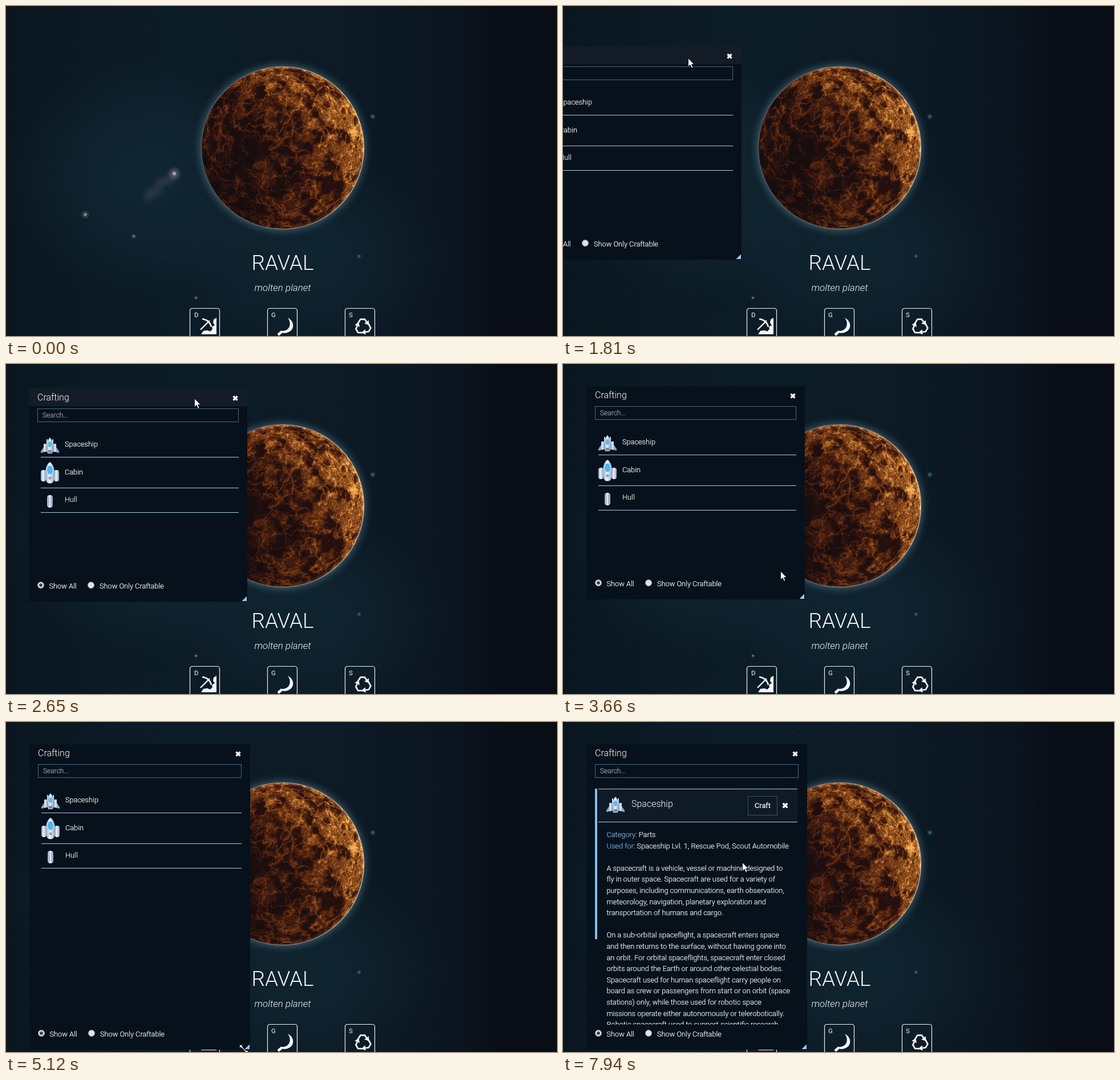
An HTML page with a canvas that plays this animation: 966 by 579 pixels, repeating every 8000 ms.

```html
<!DOCTYPE html>
<html lang="en">
<head>
<meta charset="utf-8">
<title>Crafting</title>
<style>
html, body { margin: 0; width: 100%; height: 100%; overflow: hidden; background: #0b1721; }
body { font: 300 12.75px/20px Roboto, sans-serif; color: #fff; }
#stage { position: absolute; left: 0; top: 0; width: 966px; height: 579px; overflow: hidden; }
#space, #scene { position: absolute; left: 0; top: 0; }
#panel { position: absolute; left: 0; top: 0; background: #06111b; overflow: hidden; -webkit-text-stroke: .2px; }
#panel * { box-sizing: border-box; white-space: nowrap; }
#panel div, #panel span, #panel svg { position: absolute; }
#header { left: 0; right: 0; top: 0; height: 31px; }
#header.lit { background: #131c27; }
.large { font-size: 16px; -webkit-text-stroke: 0; }
#search { left: 15px; right: 15px; top: 35px; height: 24px; border: 1px solid #426987; padding-left: 8px; line-height: 22px; font-size: 12px; color: #a5abb0; }
#list, #details { left: 0; right: 0; top: 0; bottom: 0; }
.row { left: 21px; right: 15px; border-bottom: 1px solid #a4cbed; }
.row.hover { background: #0f1b27; }
.row span { left: 42px; }
#details { bottom: 44px; overflow: hidden; }
#bar { left: 15px; top: 78px; width: 4px; height: 264px; background: #85bdf0; }
#card { left: 21px; top: 78px; height: 59px; background: #0e1a26; border: solid #a4cbed; border-width: 1px 0; }
#craft { right: 35px; top: 12px; width: 52px; height: 34px; border: 1px solid #36536b; text-align: center; line-height: 32px; font-weight: 400; }
#text { left: 35.5px; top: 149px; line-height: 19.6px; }
#text b { font-weight: 300; color: #7db9ee; }
#footer { left: 0; right: 0; bottom: 0; height: 44px; }
.radio { top: 9px; width: 12px; height: 12px; border-radius: 50%; background: #e2e2e2; border: 1px solid #9b9b9b; }
.radio.on { background: radial-gradient(circle, #444 0 2.6px, #e2e2e2 3.2px); }
#grip { right: 1px; bottom: 1px; width: 8px; height: 8px; background: linear-gradient(135deg, transparent 50%, #94c8f8 50%); }
.pointer { position: absolute; left: 0; top: 0; overflow: visible; }
</style>
</head>
<body>
<div id="stage">
  <canvas id="space" width="966" height="579"></canvas>
  <svg id="scene" width="966" height="579" fill="#f4f6f8" font-family="Roboto, sans-serif" font-weight="300">
    <defs>
      <linearGradient id="metal"><stop stop-color="#8fa6c4"/><stop offset=".45" stop-color="#eef4fb"/><stop offset="1" stop-color="#8b9fbd"/></linearGradient>
      <symbol id="ship" viewBox="0 0 32 30">
        <path d="M9 12 0 25v3l9-2h14l9 2v-3L23 12z" fill="#8ea4c0"/>
        <path d="M5 12h4v14H5zM23 12h4v14h-4zM10 4h2v12h-2zM20 4h2v12h-2z" fill="#cfdcec"/>
        <path d="M16 1c6 6 7 18 4 28h-8C9 19 10 7 16 1z" fill="url(#metal)"/>
        <ellipse cx="16" cy="13" rx="3.2" ry="5" fill="#59b9ef"/>
        <path d="M13 23h6v5h-6z" fill="#7088a8"/>
      </symbol>
      <symbol id="cabin" viewBox="0 0 32 38">
        <rect y="14" width="9" height="20" rx="4" fill="url(#metal)"/>
        <rect x="23" y="14" width="9" height="20" rx="4" fill="url(#metal)"/>
        <path d="M16 0c9 5 11 27 5 36q-5 3-10 0C5 27 7 5 16 0z" fill="url(#metal)"/>
        <ellipse cx="16" cy="14" rx="5.5" ry="8" fill="#4db4ee" stroke="#c9ecff"/>
        <circle cx="16" cy="28" r="2.5" fill="#8aa0bf"/>
      </symbol>
      <symbol id="hull" viewBox="0 0 10 22"><rect width="10" height="22" rx="4.5" fill="url(#metal)"/><path d="M3 3v16M7 3v16" stroke="#8395b5"/></symbol>
      <symbol id="cross" viewBox="0 0 12 12"><path d="M2.5 2.5l7 7m0-7l-7 7" stroke="#f4f6f8" stroke-width="3.4"/></symbol>
      <g id="key"><rect x=".5" y=".5" width="52" height="56" rx="4" fill="none" stroke="#eef2f5" stroke-width="1.2"/></g>
    </defs>
    <g text-anchor="middle">
      <text x="485" y="463" font-size="37">RAVAL</text>
      <text x="485" y="500" font-size="17" font-style="italic">molten planet</text>
    </g>
    <g font-size="11.5" font-weight="400">
      <use href="#key" x="322" y="530"/><text x="330" y="546">D</text>
      <use href="#key" x="458" y="530"/><text x="465" y="546">G</text>
      <use href="#key" x="594" y="530"/><text x="601" y="546">S</text>
    </g>
    <path d="M369 547l-5 3-1 6 3 4-5 3 1 4-4 4-5-2-7 1-4 6h27z"/>
    <path d="M341 568l16-16M344 549q13 2 16 14" fill="none" stroke="#f4f6f8" stroke-width="2.4"/>
    <path d="M494 547c14 7 13 27-8 27l-3-4c14 1 19-12 11-23z"/>
    <path d="M477 577l7-6" stroke="#f4f6f8" stroke-width="4.5"/>
    <g id="recycle"></g>
  </svg>

  <div id="panel">
    <div id="header"></div>
    <span class="large" style="left:15px;top:6px">Crafting</span>
    <svg style="right:15px;top:11px" width="12" height="12"><use href="#cross"/></svg>
    <div id="search">Search...</div>
    <div id="list">
      <div class="row" style="top:78px;height:43px"><svg width="32" height="30" style="top:7px"><use href="#ship"/></svg><span style="top:10px">Spaceship</span></div>
      <div class="row" style="top:121px;height:54px"><svg width="32" height="38" style="top:8px"><use href="#cabin"/></svg><span style="top:16px">Cabin</span></div>
      <div class="row" style="top:175px;height:43px"><svg width="10" height="22" style="left:11px;top:12px"><use href="#hull"/></svg><span style="top:10px">Hull</span></div>
    </div>
    <div id="details">
      <div id="bar"></div>
      <div id="card">
        <svg width="32" height="30" style="left:14px;top:12px"><use href="#ship"/></svg>
        <span class="large" style="left:58px;top:16px">Spaceship</span>
        <div id="craft">Craft</div>
        <svg style="right:15px;top:22px" width="13" height="13"><use href="#cross"/></svg>
      </div>
      <div id="text"><b>Category:</b> Parts<br><b>Used for:</b> Spaceship Lvl. 1, Rescue Pod, Scout Automobile<br><br>A spacecraft is a vehicle, vessel or machine designed to<br>fly in outer space. Spacecraft are used for a variety of<br>purposes, including communications, earth observation,<br>meteorology, navigation, planetary exploration and<br>transportation of humans and cargo.<br><br>On a sub-orbital spaceflight, a spacecraft enters space<br>and then returns to the surface, without having gone into<br>an orbit. For orbital spaceflights, spacecraft enter closed<br>orbits around the Earth or around other celestial bodies.<br>Spacecraft used for human spaceflight carry people on<br>board as crew or passengers from start or on orbit (space<br>stations) only, while those used for robotic space<br>missions operate either autonomously or telerobotically.<br>Robotic spacecraft used to support scientific research</div>
    </div>
    <div id="footer">
      <div class="radio on" style="left:15px"></div><span style="left:35.5px;top:7px">Show All</span>
      <div class="radio" style="left:103px"></div><span style="left:124px;top:7px">Show Only Craftable</span>
    </div>
    <div id="grip"></div>
  </div>

  <svg id="arrow" class="pointer" width="12" height="19"><path d="M.5.5v15l3.5-3.2 2.6 5.6 2.3-1-2.5-5.4h4.6z" fill="#fff" stroke="#000" stroke-width=".8"/></svg>
  <svg id="resize" class="pointer" width="1" height="1">
    <g fill="#fff" stroke="#000" stroke-width=".8"><path id="half" d="M-7.5-7.5h6l-2 2L.5-.5l-1 1-5-4-2 2z"/><use href="#half" transform="rotate(180)"/></g>
  </svg>
</div>
<script>
const $ = id => document.getElementById(id);
const clamp = (v, lo = 0, hi = 1) => Math.min(hi, Math.max(lo, v));
const mix = (a, b, k) => a + (b - a) * k;
const smooth = k => k * k * (3 - 2 * k);

// Seeded noise
function hash(x, y) {
  const s = Math.sin(x * 127.1 + y * 311.7) * 43758.5453;
  return s - Math.floor(s);
}

function noise(x, y) {
  const i = Math.floor(x), j = Math.floor(y), u = smooth(x - i), v = smooth(y - j);
  return mix(mix(hash(i, j), hash(i + 1, j), u), mix(hash(i, j + 1), hash(i + 1, j + 1), u), v);
}

function fbm(x, y, octaves) {
  let sum = 0, total = 0;
  for (let n = 0, gain = 1; n < octaves; n++, gain *= .55) {
    sum += gain * noise(x * 2.1 ** n, y * 2.1 ** n);
    total += gain;
  }
  return sum / total;
}

// Background and planet, painted once
const ctx = $('space').getContext('2d');

function glow(x, y, rx, ry, rgb, alpha) {
  ctx.save();
  ctx.translate(x, y);
  ctx.scale(rx, ry);
  const g = ctx.createRadialGradient(0, 0, 0, 0, 0, 1);
  g.addColorStop(0, `rgba(${rgb},${alpha})`);
  g.addColorStop(.5, `rgba(${rgb},${alpha * .6})`);
  g.addColorStop(1, `rgba(${rgb},0)`);
  ctx.fillStyle = g;
  ctx.fillRect(-1, -1, 2, 2);
  ctx.restore();
}

function star(x, y, r) {
  glow(x, y, r, r, '160,140,160', .45);
  glow(x, y, r * .35, r * .35, '235,220,230', .8);
}

function paintSpace() {
  const sky = ctx.createLinearGradient(0, 0, 966, 0);
  sky.addColorStop(0, '#0a1721');
  sky.addColorStop(.3, '#0c1c27');
  sky.addColorStop(.6, '#0c1b26');
  sky.addColorStop(.82, '#0b151f');
  sky.addColorStop(.9, '#090d15');
  ctx.fillStyle = sky;
  ctx.fillRect(0, 0, 966, 579);
  glow(240, 300, 240, 210, '20,45,58', .65);
  glow(530, 440, 250, 170, '19,44,56', .55);
  for (let i = 0; i < 260; i++) {
    const x = hash(i, 1) * 850, y = hash(i, 2) * 579;
    ctx.fillStyle = `rgba(${hash(i, 3) > .5 ? '90,125,145' : '3,10,16'},${.1 + hash(i, 4) * .3})`;
    ctx.fillRect(x, y, 1.2, 1.2);
  }
  for (let i = 0; i < 14; i++) {
    const along = i / 13, spread = 10 * (hash(i, 5) - .5);
    glow(mix(294, 250, along) + spread, mix(298, 338, along) + spread, 14, 12, '90,86,104', .13);
  }
  star(295, 294, 13);
  star(139, 366, 8);
  star(224, 404, 5);
  star(333, 512, 4);
  glow(643, 194, 5, 5, '58,125,160', .8);
  glow(619, 439, 4, 4, '58,125,160', .8);
}

function paintPlanet(cx, cy, radius) {
  const size = radius * 2, layer = document.createElement('canvas');
  layer.width = layer.height = size;
  const pen = layer.getContext('2d'), image = pen.createImageData(size, size);
  const crack = (x, y, sharpness) => (1 - Math.abs(2 * fbm(x, y, 2) - 1)) ** sharpness;
  for (let py = 0; py < size; py++) for (let px = 0; px < size; px++) {
    const u = (px + .5) / radius - 1, v = (py + .5) / radius - 1, r = Math.hypot(u, v);
    if (r > 1) continue;
    const bulge = 1 + .35 * r ** 4, x = u * bulge + 7, y = v * bulge + 3;
    const jagX = x + .16 * fbm(x * 12, y * 12, 2), jagY = y + .16 * fbm(x * 12 + 40, y * 12, 2);
    const grain = noise(x * 55, y * 55);
    const light = clamp(.5 + .36 * u - .2 * v + .15 * r * r, .22, 1);
    const veins = Math.max(crack(jagX * 3, jagY * 3, 20), .8 * crack(jagX * 6 + 9, jagY * 6, 18));
    const lava = clamp((fbm(x * 7, y * 7, 4) - .58 + .22 * light) * 5) * (.35 + .65 * grain);
    const heat = clamp((.25 + .75 * light) * (.7 * veins * (.55 + .45 * grain) + .75 * lava * light) + .1 * light * light);
    const rim = clamp((r - .95) * 20) * clamp(.4 + u * .6 - v * .15);
    image.data.set([
      20 + 222 * heat ** .9 + 60 * rim,
      13 + 160 * heat ** 1.35 + 55 * rim,
      14 + 72 * heat ** 2.3 + 45 * rim,
      255 * clamp((1 - r) * radius)
    ], (py * size + px) * 4);
  }
  pen.putImageData(image, 0, 0);
  ctx.shadowColor = 'rgba(110,155,180,.7)';
  ctx.shadowBlur = 16;
  ctx.drawImage(layer, cx - radius, cy - radius);
  ctx.shadowBlur = 0;
  const edge = ctx.createLinearGradient(cx - radius, cy, cx + radius, cy - 30);
  edge.addColorStop(0, 'rgba(130,120,120,.5)');
  edge.addColorStop(1, 'rgba(245,195,130,.85)');
  ctx.strokeStyle = edge;
  ctx.lineWidth = 1.3;
  ctx.beginPath();
  ctx.arc(cx, cy, radius - .5, 0, 7);
  ctx.stroke();
}

paintSpace();
paintPlanet(485, 249, 143);

$('recycle').innerHTML = [0, 120, 240].map(angle =>
  `<g transform="translate(626 562.5) rotate(${angle}) scale(1.12)"><path d="M-8.5-4.5L-4-11.5h6.5l3 4" fill="none" stroke="#f4f6f8" stroke-width="2.4"/><path d="M9-10v7.5l-7-2.5z"/></g>`).join('');

// Pointer moves, each starting where the one before ended
const moves = [
  { start: 1300, end: 1810, to: [219, 91], bend: 35 },
  { start: 2130, end: 2330, to: [325, 86], bend: 4 },
  { start: 2330, end: 2700, to: [330, 59] },
  { start: 3030, end: 3780, to: [385, 385] },
  { start: 3840, end: 4310, to: [413, 412] },
  { start: 4630, end: 5000, to: [417, 574] },
  { start: 5920, end: 6190, to: [211, 173] },
  { start: 6190, end: 6550, to: [174, 136] },
  { start: 7390, end: 7580, to: [302, 277] },
  { start: 7860, end: 7940, to: [314, 246] }
];

function pointerAt(t) {
  let x = 735, y = 46;
  for (const { start, end, to, bend = 0 } of moves) {
    const k = smooth(clamp((t - start) / (end - start)));
    x = mix(x, to[0], k);
    y = mix(y, to[1], k) + bend * Math.sin(Math.PI * k);
  }
  return [x, y];
}

// The panel trails the pointer while it is dragged or resized
const LAG = 42;
const trailing = (t, from, to) => pointerAt(clamp(t - LAG, from, to));

const place = (el, x, y) => el.style.transform = `translate(${Math.round(x)}px,${Math.round(y)}px)`;
const show = (el, on) => el.style.display = on ? '' : 'none';
const rows = [...document.querySelectorAll('.row')];

function draw(t) {
  const panel = $('panel'), [x, y] = pointerAt(t);
  const [dragX, dragY] = trailing(t, 2130, 2750), [cornerX, cornerY] = trailing(t, 4630, 5260);
  const left = dragX - 289, top = dragY - 20, width = cornerX - 30, height = cornerY - 38;
  show(panel, t >= 870);
  place(panel, left, top);
  panel.style.width = (t < 4630 ? 383 : Math.round(width)) + 'px';
  panel.style.height = (t < 4630 ? 374 : Math.round(height)) + 'px';
  $('header').classList.toggle('lit', t < 3080);

  const resizing = t >= 4200 && t < 5960;
  show($('arrow'), t >= 1300 && !resizing);
  show($('resize'), resizing);
  place($('arrow'), x, y);
  place($('resize'), x, y);

  const inside = x > left + 21 && x < left + width - 15;
  for (const row of rows) {
    const depth = y - top - row.offsetTop;
    row.classList.toggle('hover', inside && depth >= 0 && depth < row.offsetHeight);
  }
  show($('list'), t < 6860);
  show($('details'), t >= 6860);
  $('details').style.opacity = t < 6910 ? .5 : 1;
  $('bar').style.opacity = t < 7100 ? 0 : t < 7150 ? .5 : 1;
  $('card').style.right = t < 7100 ? '15px' : '17px';
}

const start = performance.now();
function frame() {
  draw((performance.now() - start) % 8000);
  requestAnimationFrame(frame);
}
frame();
</script>
</body>
</html>
```
